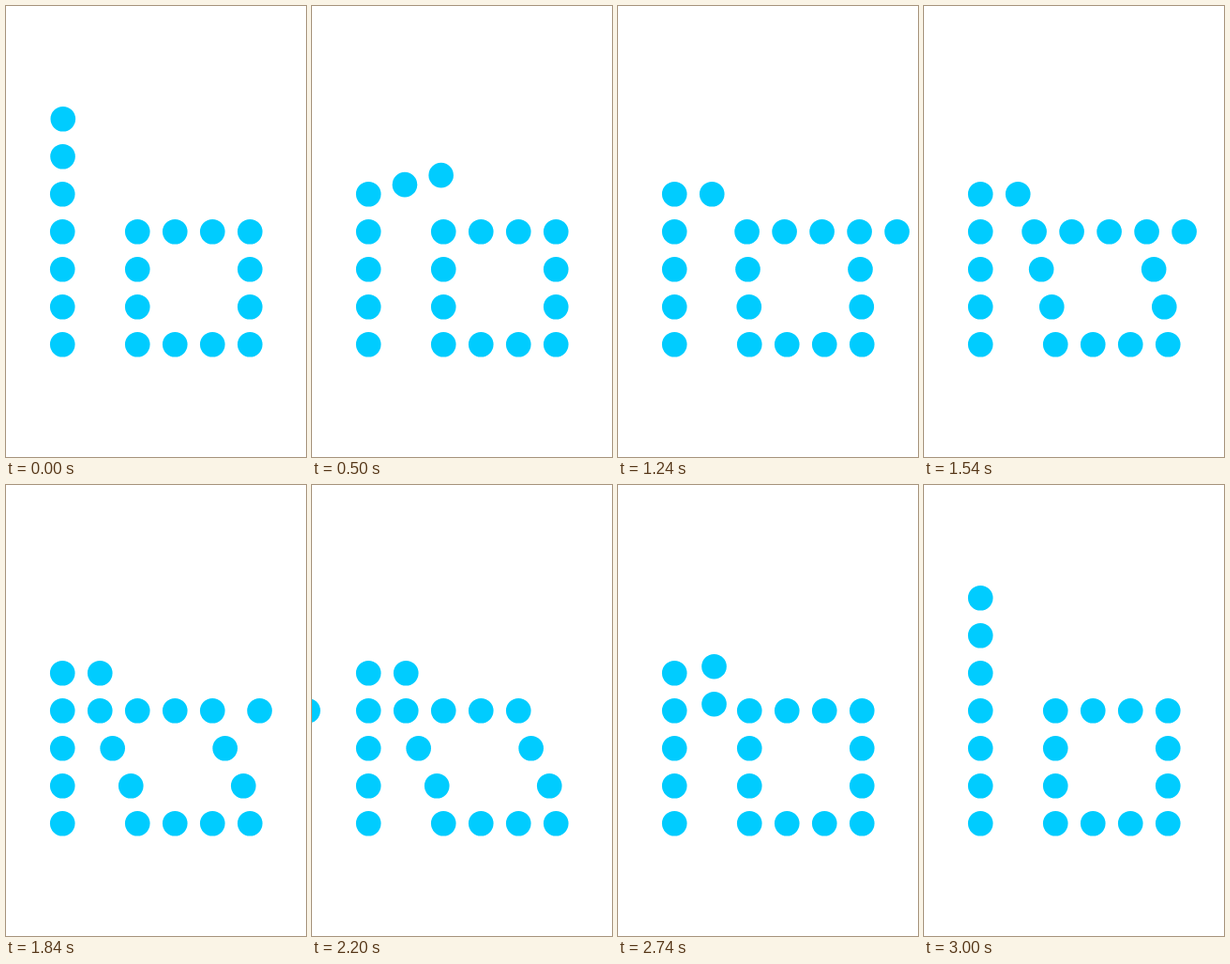
An HTML page that plays this animation: 320 px wide and 480 px high, repeating every 3.28 s.

```html
<!DOCTYPE html>
<html lang="en">
<head>
<meta charset="utf-8">
<title>Dots</title>
<style>
  html, body { margin: 0; width: 100%; height: 100%; overflow: hidden; background: #fff; }
  svg { display: block; width: 320px; height: 480px; }
</style>
</head>
<body>
<svg viewBox="0 0 320 480" fill="#00ccff"></svg>
<script>
const LOOP = 3280, STEP = 20, CELL = 40, RADIUS = 13.3, NUDGE = 0.25;
const svg = document.querySelector('svg');

const mix = (a, b, p) => a + (b - a) * p;
const part = (t, from, to) => Math.min(1, Math.max(0, (t - from) / (to - from)));
const soft = p => (p + (1 - Math.cos(Math.PI * p)) / 2) / 2;
const curve = (a, b, c, p) => mix(mix(a, b, p), mix(b, c, p), p);

// A dot on the arm that tips over around (60, 200).
function onArm(length, t) {
  const angle = Math.min(90, 0.4 + 0.15 * t) * Math.PI / 180;
  return [60 + length * Math.sin(angle), 200 - length * Math.cos(angle)];
}

// The final hop back into the column, starting at (100, y).
function hop(y, t) {
  const p = soft(part(t, 2700, 3000));
  return [curve(100, 116, 60, p), curve(y, y - 40, y - 80, p)];
}

const rowShift = t => t < 2400
  ? -CELL * part(t, 1200, 1800)
  : -CELL * (1 - part(t, 2400, 2700));

// Tips over, runs above the box, pushes the row, then wraps round the stage.
function runner(t) {
  if (t < 600) return onArm(80, t);
  if (t < 1200) {
    const way = 200 * soft(part(t, 600, 1200));
    return [140 + Math.min(way, 160), 200 + Math.max(way - 160, 0)];
  }
  if (t < 1800) return [300 + rowShift(t), 240];
  if (t < 2100) return [mix(260, 337, part(t, 1800, 2100)), 240];
  if (t < 2400) return [mix(-17, 20, part(t, 2100, 2400)), 240];
  return [60 + rowShift(t), 240];
}

function layout(t) {
  const shift = rowShift(t);
  const dots = [
    runner(t),
    t < 2700 ? onArm(40, t) : hop(200, t),
    t < 2400 ? [60, 240] : t < 2700 ? [100 + shift, 240] : hop(240, t)
  ];
  for (const y of [200, 280, 320, 360]) dots.push([60, y]);
  for (let x = 140; x <= 260; x += CELL) dots.push([x + shift, 240], [x, 360]);
  for (const x of [140, 260]) dots.push([x + shift * 0.665, 280], [x + shift * 0.175, 320]);
  return dots;
}

const circles = layout(0).map(() => {
  const c = document.createElementNS('http://www.w3.org/2000/svg', 'circle');
  c.setAttribute('r', RADIUS);
  return svg.appendChild(c);
});

function draw(t) {
  layout(t).forEach(([x, y], i) => {
    circles[i].setAttribute('cx', x + NUDGE);
    circles[i].setAttribute('cy', y + NUDGE);
  });
}

const start = performance.now();
function tick() {
  const t = (performance.now() - start) % LOOP;
  draw(Math.floor(t / STEP) * STEP);
  requestAnimationFrame(tick);
}
tick();
</script>
</body>
</html>
```
